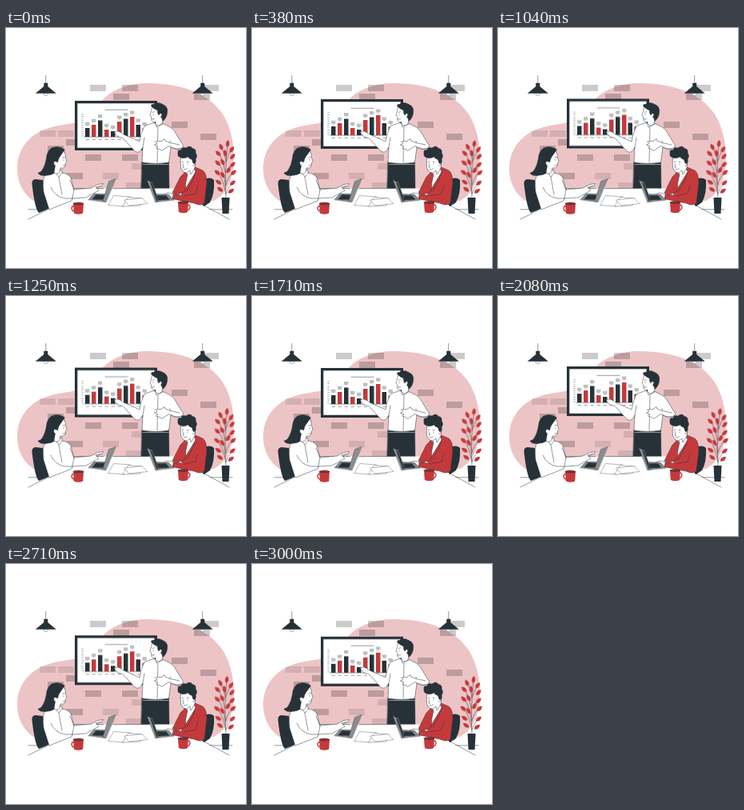
Write an HTML page without scripts that moves like this. It is 300 by 300 pixels and loops after 3040 ms.

```html
<!DOCTYPE html>
<html lang="en">
<head>
<meta charset="utf-8">
<title>Team meeting</title>
<style>
html, body { margin: 0; width: 100%; height: 100%; overflow: hidden; background: #fff; }
svg { display: block; width: 100vw; height: 100vh; }
.dark { fill: #263238; }
.red { fill: #c43a3c; }
.white { fill: #fff; }
.line { fill: none; }
.ink { stroke: #263238; stroke-width: .5; stroke-linecap: round; stroke-linejoin: round; }
.fine { stroke-width: .35; }
.board { animation: float 1520ms linear infinite; }
.plant { transform-origin: 275px 214px; animation: sway 1520ms linear infinite; }
@keyframes float { 50% { transform: translateY(-4px); } }
@keyframes sway {
  25% { transform: rotate(.7deg); }
  75% { transform: rotate(-1deg); }
}
</style>
</head>
<body>
<svg viewBox="0 0 300 300">
  <defs>
    <path id="brick" d="M0 0h20v8H0z"/>
    <path id="leaf" d="M0 4C-3.300 1.500-2.800-2 0-5C2.800-2 3.300 1.500 0 4z"/>
    <path id="tip" d="M-2.700-4h5.400v4H1L0 1.200L-1 0h-1.700z"/>
    <g id="lamp">
      <path class="line ink" d="M0 59.500V69"/>
      <path class="white ink fine" d="M-3 82a3 2.700 0 0 0 6 0z"/>
      <path class="dark" d="M-2.500 68.800h5V73L13 81.800h-26L-2.500 73z"/>
    </g>
    <g id="mug">
      <path class="line" stroke="#c43a3c" stroke-width="1.500" d="M-6 222.500c-3.200-.5-3.200 6.500.5 6.300"/>
      <path class="red" d="M-6.500 219.500h13l-.8 12q-5.700 2.600-11.400 0z"/>
      <ellipse class="ink" cy="219.500" rx="6.400" ry="1.500" fill="#8f2a2c"/>
    </g>
  </defs>

  <!-- wall -->
  <path fill="#edc4c6" d="M14 176C14 146 36 126 68 121.500C96 118 107 112 119 92C131 77 153 69 177 69C221 69 255 83 271 108C285 130 288 164 282 185C279 200 271 210 260 216H34C22 207 14 194 14 176z"/>
  <g opacity=".2">
    <use href="#brick" x="105" y="71"/>
    <use href="#brick" x="246" y="71"/>
    <use href="#brick" x="145" y="71"/>
    <use href="#brick" x="134" y="82"/>
    <use href="#brick" x="235" y="82"/>
    <use href="#brick" x="207" y="117"/>
    <use href="#brick" x="243" y="132"/>
    <use href="#brick" x="75" y="139"/>
    <use href="#brick" x="52" y="147"/>
    <use href="#brick" x="99" y="158"/>
    <use href="#brick" x="145" y="158"/>
    <use href="#brick" x="76" y="181"/>
  </g>
  <g opacity=".1">
    <use href="#brick" x="42" y="128"/>
    <use href="#brick" x="65" y="128"/>
    <use href="#brick" x="157" y="169"/>
    <use href="#brick" x="121" y="181"/>
    <use href="#brick" x="150" y="193"/>
  </g>
  <path class="line ink" d="M28 226.800H283"/>
  <use href="#lamp" x="49.800"/>
  <use href="#lamp" x="245.700"/>

  <!-- screen with chart -->
  <g class="board">
    <path class="dark" d="M86 91h103v62H86z"/>
    <path class="white" d="M89.300 94.300h96.400v55.400H89.300z"/>
    <path class="line ink" d="M124 102.300h28M97.500 136.200h81"/>
    <path class="line" stroke="#8b9094" stroke-width="2.500" stroke-dasharray=".7 2" d="M95.500 107.500v28"/>
    <path class="line" stroke="#8b9094" stroke-width=".8" stroke-dasharray="4.500 3.500" d="M99.500 139.500h79"/>
    <path class="dark" d="M99 125h5.500v11H99zM115 115.500h5.500V136H115zM131 129h5.500v7H131zM147 113.500h5.500V136H147zM162.500 121h5.500v15h-5.500z"/>
    <path class="red" d="M107 121h5.500v15H107zM123 127h5.500v9H123zM139 117h5.500v19H139zM155 111h5.500v25H155zM170.500 125.500h5.500V136h-5.500z"/>
    <g fill="#bdbfc0">
      <use href="#tip" x="101.700" y="121.700"/>
      <use href="#tip" x="109.700" y="117.700"/>
      <use href="#tip" x="117.700" y="112"/>
      <use href="#tip" x="125.700" y="123.700"/>
      <use href="#tip" x="133.700" y="125.700"/>
      <use href="#tip" x="141.700" y="113.500"/>
      <use href="#tip" x="149.700" y="110"/>
      <use href="#tip" x="157.700" y="107.500"/>
      <use href="#tip" x="165.200" y="117.500"/>
      <use href="#tip" x="173.200" y="122"/>
    </g>
  </g>

  <!-- presenter -->
  <g class="ink">
    <path class="dark" d="M170 167h33.500l.5 35H169z"/>
    <path class="white" d="M183 119L174 122Q170 126 167 142L148 133.500L143.500 130.500L139 128.500L138 130L135.500 129L136 131.500L140 136L146 137.500L161 154Q167 158 171 149L170 168Q187 171 203.500 168L206 149L214 152L220 150Q223 147 219 143L210 128Q207 124 195 119z"/>
    <path class="white" d="M182.500 100Q181 106 180 109.500L181.700 111L182 115.500Q183 118.500 187 117.500V120Q190 124 195 119.500L198 108L193 99z"/>
    <path class="dark" d="M182 98Q180.500 95 184 95.500Q189 92 195 95Q202 97.500 201.700 104Q201.500 112 196 116.500Q195 112 193.500 111.500Q196 108 193.500 106.500Q191.500 107 191 109Q189 106 189.500 103Q186 102 182 98z"/>
    <path class="line" d="M183.300 105.500l2-.8M184 107.800v.9M182.300 114q2 .8 3.300-.5M187 120l1 4 2-1 6-3M190 124l-1 44M171 149l2-12M206 149l-1-8"/>
    <path class="white" d="M220 150Q212 153 204 147.500L198 151L195 153.500L192 151.500L187.500 150L190 148L185.500 146L189 144.500L186.500 142L194 141.500L198 138.500L199 141L205 143.500L217 146"/>
    <path class="line" stroke="#fff" d="M171 170.500h32"/>
  </g>

  <!-- plant -->
  <g class="plant">
    <path class="line ink" d="M275 214Q273 180 277 145M275 208Q272 190 265 181M275 207Q278 198 283 194M274.500 197Q272 178 266 169M275 196Q277 187 283 181M274 181Q272 166 266 157M275 180Q278 175 283 170M275 168Q274 157 269 149M275.500 166Q278 158 282 152"/>
    <g class="red">
      <use href="#leaf" transform="translate(277 145)rotate(8)"/>
      <use href="#leaf" transform="translate(269 149)rotate(-25)"/>
      <use href="#leaf" transform="translate(282 152)rotate(35)"/>
      <use href="#leaf" transform="translate(265.500 157)rotate(-45)"/>
      <use href="#leaf" transform="translate(274 157)rotate(-8)"/>
      <use href="#leaf" transform="translate(283 161)rotate(42)"/>
      <use href="#leaf" transform="translate(265 169)rotate(-45)"/>
      <use href="#leaf" transform="translate(271 168)rotate(-28)"/>
      <use href="#leaf" transform="translate(283 171)rotate(45)"/>
      <use href="#leaf" transform="translate(264.500 181)rotate(-50)"/>
      <use href="#leaf" transform="translate(278 178)rotate(28)"/>
      <use href="#leaf" transform="translate(284 181)rotate(48)"/>
      <use href="#leaf" transform="translate(271 184)rotate(-32)"/>
      <use href="#leaf" transform="translate(266 193)rotate(-55)"/>
      <use href="#leaf" transform="translate(283 194)rotate(50)"/>
      <use href="#leaf" transform="translate(268 202)rotate(-55)"/>
      <use href="#leaf" transform="translate(281 204)rotate(55)"/>
    </g>
  </g>
  <path class="dark" d="M269.500 212h10l-1 20h-8z"/>

  <!-- chairs and table -->
  <path class="dark" d="M32.500 195Q32 189.500 37 189L46 190Q50 205 54 226L41 231Q36 226 32.500 195z"/>
  <path class="dark" d="M245 190Q256 185 260 190Q261 207 255 218L246 224z"/>
  <path class="white" d="M28 239L52 226.500L86 200.500H213L250 224.500L279 239z"/>
  <path class="line ink" d="M28 239L54 226M279 239L246 221M84 200.500H122M134 200.500H178"/>

  <!-- woman -->
  <g class="ink">
    <path class="white" d="M60 178L58 181L49 184Q45 188 47 205L54 227L82 216L83 213L100 212L116 203L112 199L120 197.500L121.500 194.500L115 195.500L106 200L85 202L81 187Q78 182 70 181V178z"/>
    <path class="dark" d="M72 151Q65 146.500 57 150Q51 154 50.500 163Q49 172 45 178Q43 181 40 181Q42 185 49 184.500Q57 184 61 181Q64 178 63 174L73 158z"/>
    <path class="white" d="M72 153Q75 158 74.500 162L76 167L74.500 168.500L74 173Q72 176 68 175L67 180Q64 184 60 181L61.500 172Q58 169 61 166.500Q64 167 64.500 168Q66 160 72 153z"/>
    <path class="dark" d="M73 152Q67 150 61 154V166Q67 163 73 152z"/>
    <path class="line" d="M71 162l2.300-.6M72 164.500v1M71 172q2 .5 3-.8M63 182l3 4 4-4.500M66 186l4 22M56 199q5 12 18 14l9 0M83 213l2-11M80 190l5 12"/>
  </g>

  <!-- man in red jacket -->
  <g class="ink">
    <path class="white" d="M224 178L219 193L222 210H236L240 180L234 174z"/>
    <path class="red" d="M234 173L246 178Q251 182 251 194L248 219Q243 223 235 219L207 213.500L208 208L221 209L219 207L226 198L237 180z"/>
    <path class="red" d="M224 180L218 186L208 206L213 209L224 204Q224 194 227 183z"/>
    <path class="white" d="M219 160Q217.500 168 218.500 174Q220 181 226 181L230 178L231 183L236 175L237 166L231 158z"/>
    <path class="dark" d="M219 162Q214 161 215 156.500Q214 152 219 152.500Q220 148 225 150Q230 146 233 150.500Q238 151 237 156Q240 160 237 164Q238 168 235 170Q233 168 232.500 164.500Q229 164 227.500 161Q222 164 219 162z"/>
    <path class="line" d="M220 167.500l2-.5M226 167.500l2.200.2M221 169.500v.8M227 169.800v.8M222 171l-1 3 1.500.3M222 176.500q3 1.300 4.500-.7M234 168q3-1 2.500 2t-3 2M240 197l-3 10-14 3M237 180l-3 9-8 15"/>
    <path class="white" d="M209 207.500L202 206L196 208.500L199 209.500L196 211.500L200 214L208 213.500z"/>
  </g>

  <!-- laptops and papers -->
  <g class="ink fine">
    <path fill="#84888b" d="M103 214.500L110 207L128 207.500L124 217.500z"/>
    <path class="dark" d="M108 214l4.500-5.500 11 .4-2.500 5.600z"/>
    <path fill="#8a8c8f" d="M125 217.500L121 216L128.500 191.500L137 188.500z"/>
    <path fill="#84888b" d="M187 217.500L185 207.500L203 208L210 215z"/>
    <path class="dark" d="M189 209.500h11l4 5-14 .6z"/>
    <path fill="#8a8c8f" d="M176 190L183 193L191 216.500L187 217.500z"/>
    <path class="dark" d="M180.500 193l2 1 7.500 21.500-1.500.5z"/>
    <path class="white" d="M135 209.500L156 211L149 223L128 221.500z"/>
    <path class="white" d="M153 211.500L171 213L168 222L146 223z"/>
    <path class="white" d="M148 215L170 212.500L177 219.500L154 222z"/>
    <path class="line" d="M113 201l5-4"/>
  </g>
  <use href="#mug" x="90.500"/>
  <use href="#mug" transform="translate(221.500)scale(-1 1)" y="-1.500"/>
</svg>
</body>
</html>
```
